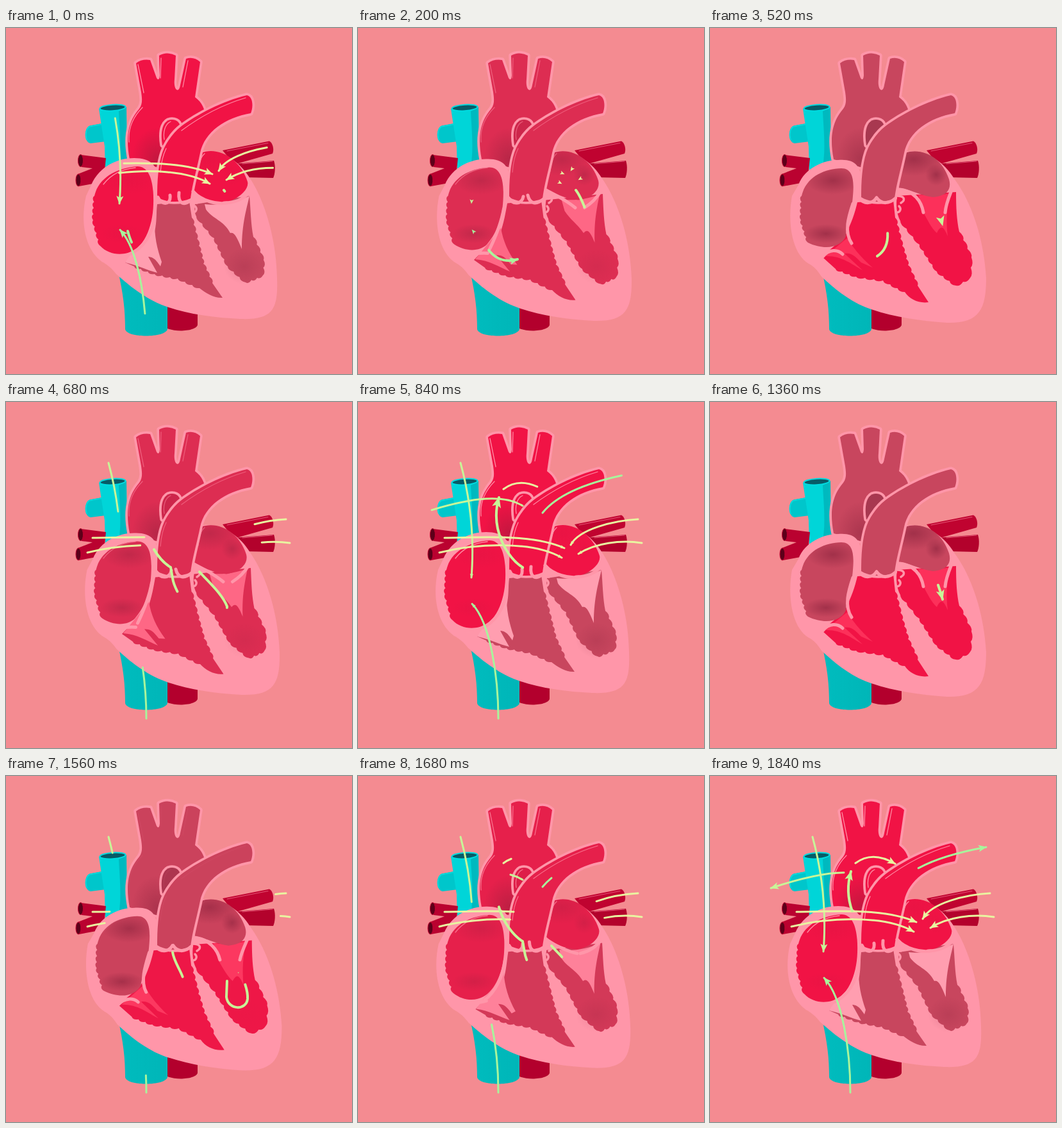
Recreate the animation shown at these times as an HTML page. Size 540x540 px, loop 1.88 s.

```html
<!DOCTYPE html>
<html lang="en">
<head>
<meta charset="utf-8">
<title>Beating heart</title>
<style>
  html, body { margin: 0; width: 100%; height: 100%; overflow: hidden; background: #f48b91; }
  svg { display: block; width: 100vw; height: 100vh; }
</style>
</head>
<body>
<svg id="stage" viewBox="0 0 540 540" fill="none" stroke-linecap="round" stroke-linejoin="round">
  <defs>
    <radialGradient id="shade">
      <stop offset="0" stop-color="#7d1c36" stop-opacity=".6"/>
      <stop offset="1" stop-color="#7d1c36" stop-opacity="0"/>
    </radialGradient>
    <linearGradient id="teal">
      <stop offset="0" stop-color="#00bcbe"/><stop offset="1" stop-color="#00b6b8"/>
    </linearGradient>
    <clipPath id="aortaClip"><use href="#aorta"/></clipPath>
    <clipPath id="atriumClip"></clipPath>
  </defs>

  <g id="veins">
    <path fill="#b3002d" d="M248 425H299V463C297 475 254 475 248 466Z"/>
    <path fill="url(#teal)" d="M175 380C183 415 186 440 186 470C188 484 249 484 252 470V424Z"/>
    <path fill="#00c6cb" d="M155 148L131 152.500C121 156 122 179 132 180L156 177Z"/>
    <path stroke="#00d8da" stroke-width="2" d="M150 150L131 153.500C125 156 123 167 126 174"/>
    <path fill="#00d5d8" d="M145 126L154 185L155 225H192L189 185L188 123Z"/>
    <path fill="#00b9bf" d="M176 130L188 124L188 175L191 215H176C181 190 177 155 176 130Z"/>
    <ellipse cx="166.500" cy="124.500" rx="20" ry="4.800" fill="#075b67" stroke="#00dbe0" stroke-width="2" transform="rotate(-4 166 125)"/>
    <path fill="#ba0230" d="M117 198L156 203L152 240L114 247L112 228L135 219L118 217Z"/>
    <ellipse cx="116.500" cy="207" rx="4" ry="9.500" fill="#5c0019" stroke="#c00330"/>
    <ellipse cx="113" cy="237.500" rx="4" ry="9.500" fill="#5c0019" stroke="#c00330"/>
    <path fill="#b3022c" d="M355 212L418 207C421 215 420 228 417 234L372 233Z"/>
    <path fill="#c00330" d="M338 191L411 176.500C416 179 419 189 416 196L356 213Z"/>
    <path stroke="#e55474" stroke-width="1.200" d="M345 192L409 179.500M369 212L416 208"/>
  </g>

  <path id="aorta" class="artery" d="M193 205C184 160 197 139 208 126C214 118 212 108 211 100L203 55Q212 48 225 50L235 78Q239 84 240 74L239 43Q251 36 265 43L263 80C261 97 270 103 272 89L281 48Q293 44 303 53L295 108C309 118 313 134 310 148L245 220Z"/>
  <g clip-path="url(#aortaClip)"><ellipse cx="236" cy="205" rx="40" ry="50" fill="url(#shade)" opacity=".65"/></g>
  <path class="shine" d="M192 178C190 155 200 137 213 124M206 57L215 101M242 47L241 78M284 51L276 92"/>
  <path id="body" fill="#ff96a9"/>
  <g id="chambers"></g>
  <path id="stub" class="artery" d="M244 183C240 158 246 143 259 143C268 143 275 150 270 162L256 190Z"/>
  <path class="artery" d="M376 105C337 114 297 136 274 153C261 163 252 177 247 187C238 207 236 235 236 264C250 273 272 273 288 266C291 243 297 224 303 195C310 162 342 140 382 133C386 124 386 107 376 105Z"/>
  <path class="shine" d="M247 174C245 162 248 150 257 146M274 160C305 137 340 119 374 109M241 225C242 212 245 198 250 188"/>
  <g id="valves" stroke="#ff96a9" stroke-width="5"></g>
  <path stroke="#ff96a9" stroke-width="3.500" d="M292 262C303 262 306 268 298 273M291 288C297 288 299 282 295 278"/>
  <g id="arrows"></g>
</svg>

<script>
const SVG = 'http://www.w3.org/2000/svg';
const LOOP = 1880, BEAT = 960, STEP = 40;
const BRIGHT = [241, 19, 69], DIM = [200, 70, 94], PINK = [255, 158, 176], LIT = [252, 48, 90];
const $ = id => document.getElementById(id);

function add(parent, tag, attrs) {
  const el = document.createElementNS(SVG, tag);
  set(el, attrs);
  parent.append(el);
  return el;
}
function set(el, attrs) {
  for (const key in attrs) el.setAttribute(key, attrs[key]);
}
const lerp = (a, b, k) => a + (b - a) * k;
const mix = (a, b, k) => `rgb(${a.map((c, i) => Math.round(lerp(c, b[i], k)))})`;

// Piecewise interpolation through [time, value] keys.
function track(keys, t, ease = x => x) {
  if (t <= keys[0][0]) return keys[0][1];
  for (let i = 1; i < keys.length; i++) {
    const [t0, v0] = keys[i - 1], [t1, v1] = keys[i];
    if (t < t1) return lerp(v0, v1, ease((t - t0) / (t1 - t0)));
  }
  return keys[keys.length - 1][1];
}

// "W x y n" draws n scallops to x,y; all other commands are plain path data.
function scallop(x0, y0, x, y, n) {
  const dx = (x - x0) / n, dy = (y - y0) / n, len = Math.hypot(dx, dy);
  const nx = dy / len * 4.5, ny = -dx / len * 4.5;
  let d = '';
  for (let i = 0; i < n; i++) {
    const sx = x0 + dx * i, sy = y0 + dy * i;
    d += `Q${sx + dx * .65 + nx} ${sy + dy * .65 + ny} ${sx + dx} ${sy + dy}`;
  }
  return d;
}
function morph([a, b], k) {
  const target = b.match(/[\d.]+/g);
  let i = 0, x = 0, y = 0;
  const blend = a.replace(/[\d.]+/g, n => lerp(+n, +target[i++], k).toFixed(2));
  return blend.replace(/([MLCWZ])([^MLCWZ]*)/g, (all, cmd, args) => {
    const v = args.trim().split(/\s+/).map(Number);
    if (cmd === 'W') all = scallop(x, y, v[0], v[1], Math.round(v[2]));
    if (cmd === 'W') [x, y] = v;
    else if (cmd !== 'Z') [x, y] = v.slice(-2);
    return all;
  });
}

// Each shape has a filling pose and a contracting pose.
const bodyPose = [
  'M133 245 C146 215 175 203 200 203 C226 203 238 215 238 240 L296 195 C325 183 362 203 381 235 C404 270 422 330 423 390 C425 440 416 456 365 454 C315 452 262 443 230 426 C202 411 186 396 172 384 C165 375 158 369 150 365 C122 345 116 300 125 262 Z',
  'M138 245 C148 218 178 206 200 206 C226 204 236 215 236 240 L296 195 C325 185 362 203 381 235 C407 270 427 325 431 390 C431 440 420 461 370 460 C318 457 265 447 232 431 C204 416 188 401 174 388 C169 380 164 374 158 370 C126 355 121 300 128 262 Z'
];
const chamberPoses = {
  ventricle: [[
    'M236 275 L286 270 L290 296 W301 340 4 W308 368 3 W322 398 3 L338 421 C325 422 312 414 302 406 W268 391 3 W232 384 3 W200 372 3 L186 366 C200 352 222 335 232 318 C236 300 234 290 236 275 Z',
    'M230 272 L286 268 L289 296 W300 340 4 W309 370 3 W324 402 3 L341 428 C326 430 312 424 304 412 W270 394 3 W228 388 3 W196 376 3 L176 358 C184 346 200 338 212 322 C220 305 226 290 230 272 Z'
  ], [
    'M295 275 L380 262 C382 285 382 305 386 326 W402 362 3 W401 386 2 W374 397 3 W346 372 3 W325 328 4 W297 294 3 C294 288 294 282 295 275 Z',
    'M292 262 L384 256 C384 280 385 300 389 318 W408 358 3 W406 390 2 W384 402 2 W354 380 3 W327 338 4 W297 301 3 C291 290 290 275 292 262 Z'
  ]],
  leaflet: [[
    'M186 366 L232 296 C231 325 236 345 243 365 L241 372 C232 358 228 358 222 357 L236 382 C220 378 205 370 186 366 Z',
    'M180 356 L214 328 C222 340 232 355 254 374 L236 366 C228 358 222 350 210 352 L238 378 C220 368 205 355 180 356 Z'
  ], [
    'M310 275 C335 278 360 272 380 262 C376 280 368 305 368 345 C360 325 356 318 350 320 C340 300 322 298 312 283 Z',
    'M325 260 C340 262 355 262 374 258 C370 280 368 300 371 325 C364 308 360 308 354 320 C345 312 340 300 333 288 Z'
  ]],
  atrium: [[
    'M205 216 C226 216 231 245 230 275 C229 312 214 346 190 351 C175 355 158 352 147 340 W136 300 4 W138 262 4 C145 232 175 218 205 216 Z',
    'M205 219 C224 219 225 240 223 262 C221 290 214 300 212 325 C205 342 180 348 153 335 W142 300 4 W143 262 4 C150 232 178 220 205 219 Z'
  ], [
    'M304 195 C332 184 366 205 377 240 C380 252 362 268 340 273 C318 272 298 264 292 250 C294 225 298 205 304 195 Z',
    'M304 195 C332 186 362 202 373 236 C377 250 372 262 348 264 C330 262 314 252 295 250 C295 225 299 205 304 195 Z'
  ]]
};
const valvePoses = [
  ['M292 255 C305 270 330 276 345 273', 'M296 252 C318 254 330 270 333 288'],
  ['M380 256 C372 266 358 273 340 273', 'M376 256 C372 266 368 276 367 288'],
  ['M232 290 C230 320 215 345 190 354', 'M223 274 C216 295 209 318 221 336'],
  ['M165 356 C178 358 190 356 198 350', 'M176 357 C186 344 200 346 207 353'],
  ['M237 264 C243 278 258 276 256 261', 'M233 266 C241 276 254 274 260 265'],
  ['M270 257 C268 274 278 278 288 269', 'M260 265 C268 276 280 274 289 266']
];

const chambers = [];
for (const kind in chamberPoses)
  for (const pose of chamberPoses[kind]) {
    chambers.push({ kind, pose, el: add($('chambers'), 'path', {}) });
    if (kind === 'atrium') chambers.push({ kind, pose, el: add($('atriumClip'), 'path', {}) });
  }
const atriumShade = add($('chambers'), 'g', { 'clip-path': 'url(#atriumClip)' });
const shades = [[181, 321, 34, 15], [192, 238, 42, 22], [318, 205, 46, 26], [353, 229, 17, 17]].map(([cx, cy, rx, ry]) =>
  add(atriumShade, 'ellipse', { cx, cy, rx, ry, fill: 'url(#shade)' }));
const tipShade = add($('chambers'), 'ellipse', { cx: 372, cy: 372, rx: 32, ry: 28, fill: 'url(#shade)' });
add($('chambers'), 'path', { class: 'shine', d: 'M152 244C164 228 182 220 202 218M300 224C301 211 304 201 310 196' });
const valves = valvePoses.map(pose => ({ pose, el: add($('valves'), 'path', {}) }));
const arteries = document.querySelectorAll('.artery');
const shines = document.querySelectorAll('.shine');
arteries.forEach(el => set(el, { stroke: '#ff96a9', 'stroke-width': 7.5, 'paint-order': 'stroke' }));
shines.forEach(el => set(el, { stroke: '#ff8ba3', 'stroke-width': 1.3 }));

// Flow arrows: path, colour, keys of the leading end, keys of the tail, keys of the head size.
const YELLOW = '#e9f5a0', LIME = '#c8f598', GREEN = '#a8f59c';
const inflow = (d, color) => [d, color, [[560, 0], [840, 1]], [[890, 0], [1160, 1]], [[800, 0], [880, 1], [1080, 1], [1160, .55], [1240, 0]]];
const outflow = (d, color) => [d, color, [[700, 0], [860, 1]], [[850, 0], [950, 1]], [[840, 0], [880, 1], [920, 1], [950, 0]]];
const NONE = [[0, 0]];
const arrows = [
  inflow('M160 95C175 150 182 210 177 274', LIME),
  inflow('M219 494C219 430 207 345 178 315', GREEN),
  inflow('M135 212C190 212 270 205 322 228', YELLOW),
  inflow('M127 235C180 222 270 215 318 243', YELLOW),
  inflow('M437 183C400 185 345 198 332 223', YELLOW),
  inflow('M443 220C410 215 370 220 344 237', YELLOW),
  outflow('M257 162C225 142 170 150 95 175', LIME),
  outflow('M288 173C315 140 370 122 431 111', GREEN),
  ['M227 136C243 124 264 122 289 137', YELLOW, [[680, 0], [870, 1]], [[880, 0], [950, 1]], [[840, 0], [880, 1], [920, 1], [950, 0]]],
  ['M250 361C268 356 279 340 277 318C274 305 262 290 260 275L257 258C235 245 205 200 220 149', LIME,
    [[430, 0], [520, .22], [600, .42], [800, 1]], [[500, 0], [520, .05], [600, .25], [840, .49], [880, .74], [940, 1]], [[780, 0], [840, 1.300], [920, 1], [945, 0]]],
  ['M190 317C194 332 197 338 205 348C218 363 232 366 249 361', GREEN,
    [[910, 0], [960, .22], [1160, 1]], [[960, 0], [1160, .4], [1290, 1]], [[1100, 0], [1160, 1], [1240, 1], [1300, 0]]],
  ['M340 253C347 262 357 285 363 308', LIME,
    [[940, 0], [960, .04], [1160, .5], [1320, 1]], [[1170, 0], [1480, 1]], [[1300, 0], [1340, 1.200], [1500, 1.200], [1570, 0]]],
  ['M367 308C372 322 378 335 377 348C375 366 347 366 344 345L345 319C338 300 315 280 302 265', LIME,
    [[500, 0], [520, 0], [600, .62], [680, 1]], [[590, .07], [600, .1], [740, 1]], NONE]
].map(([d, color, lead, tail, size]) => {
  const line = add($('arrows'), 'path', { d, stroke: color, pathLength: 1 });
  const head = add($('arrows'), 'path', { d: 'M1 0L-12 -5.500L-9 0L-12 5.500Z', fill: color });
  const len = line.getTotalLength();
  const end = line.getPointAtLength(len), before = line.getPointAtLength(len - 6);
  const angle = Math.atan2(end.y - before.y, end.x - before.x) * 180 / Math.PI;
  const inChamber = lead[0][0] < 560 || lead[0][0] > 900;
  line.setAttribute('stroke-width', inChamber ? 4 : 3);
  return { line, head, lead, tail, size, place: `translate(${end.x} ${end.y}) rotate(${angle})` };
});

function drawArrow({ line, head, lead, tail, size, place }, phase) {
  const t = phase < lead[0][0] ? phase + BEAT : phase;
  const to = track(lead, t), from = track(tail, t), scale = track(size, t);
  set(line, {
    visibility: to > from ? 'visible' : 'hidden',
    'stroke-dasharray': `${Math.max(to - from, .001)} 9`,
    'stroke-dashoffset': -from
  });
  set(head, { transform: `${place} scale(${scale})`, visibility: scale > 0 ? 'visible' : 'hidden' });
}

const smooth = x => x * x * (3 - 2 * x);
const beatKeys = [[0, 0], [200, .5], [400, 1], [560, 1], [800, 0]];

function draw(time) {
  const phase = Math.floor(time % LOOP / STEP) * STEP % BEAT;
  const k = track(beatKeys, phase, smooth);
  const fills = { ventricle: mix(DIM, BRIGHT, k), atrium: mix(BRIGHT, DIM, k), leaflet: mix(PINK, LIT, k) };
  $('body').setAttribute('d', morph(bodyPose, k));
  chambers.forEach(({ kind, pose, el }) => set(el, { d: morph(pose, k), fill: fills[kind] }));
  valves.forEach(({ pose, el }) => el.setAttribute('d', morph(pose, k)));
  arteries.forEach(el => el.setAttribute('fill', fills.atrium));
  $('stub').setAttribute('fill', mix(BRIGHT, [168, 56, 80], k));
  shades.forEach(el => el.setAttribute('opacity', .1 + .75 * k));
  tipShade.setAttribute('opacity', .3 * (1 - k));
  shines.forEach(el => el.setAttribute('opacity', 1 - k));
  arrows.forEach(arrow => drawArrow(arrow, phase));
}

const start = performance.now();
function tick() {
  draw(performance.now() - start);
  requestAnimationFrame(tick);
}
tick();
</script>
</body>
</html>
```
